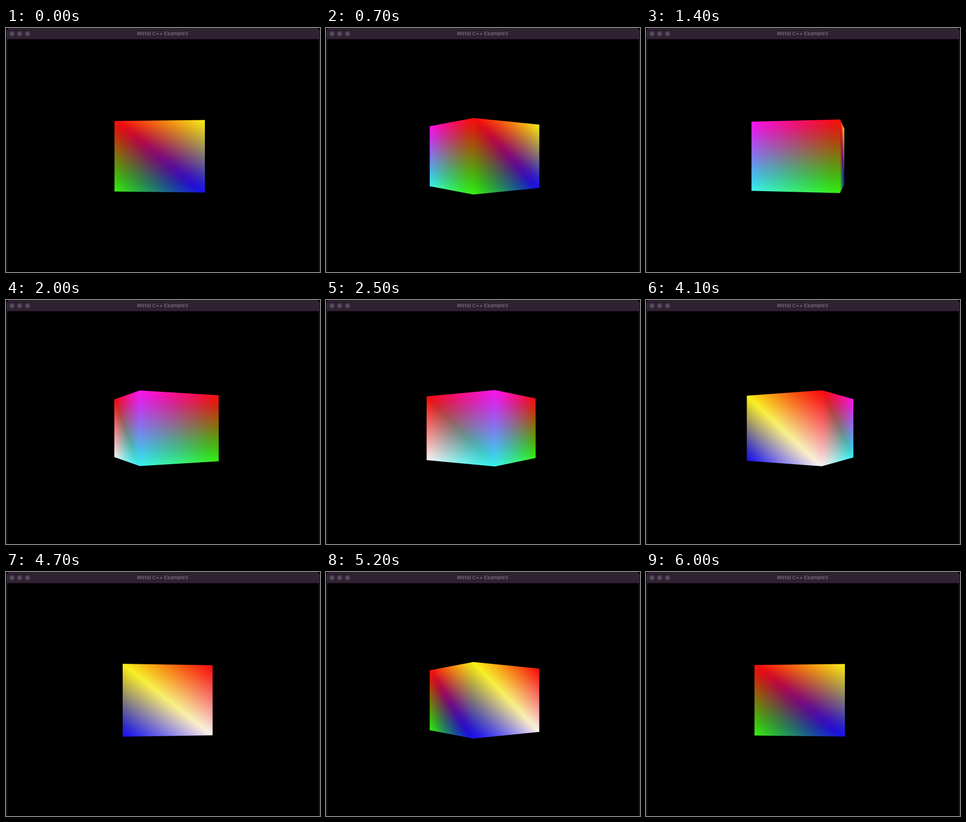
Write an HTML page with a canvas that moves like this. It is 600 px wide and 468 px high and loops after 6100 ms.

```html
<!DOCTYPE html>
<html lang="en">
<head>
<meta charset="utf-8">
<title>Metal C++ Example5</title>
<style>
  html, body { margin: 0; width: 100%; height: 100%; overflow: hidden; background: #000; }
  svg, canvas { position: absolute; left: 0; top: 0; display: block; }
  text { font: 700 9.4px Inter, "Open Sans", sans-serif; letter-spacing: .18px; fill: #6f6373; text-anchor: middle; }
</style>
</head>
<body>
<canvas id="view" width="600" height="468"></canvas>
<svg width="600" height="468" viewBox="0 0 600 468">
  <path d="M1 21.5V7Q1 1 7 1H593Q599 1 599 7V21.5Z" fill="#2f2131"/>
  <path d="M1.5 468V7Q1.5 1 7.5 1H592.5Q598.5 1 598.5 7V468" fill="none" stroke="#39333a"/>
  <g fill="#54485a">
    <circle cx="11.2" cy="11.1" r="4.6"/>
    <circle cx="26.1" cy="11.1" r="4.6"/>
    <circle cx="41" cy="11.1" r="4.6"/>
  </g>
  <text x="299.6" y="14.3">Metal C++ Example5</text>
</svg>
<script>
const ctx = document.getElementById('view').getContext('2d');

// Camera: screen centre, focal lengths and distance for a cube of half-size 1
const CX = 300, CY = 246, FX = 534, FY = 422, DIST = 7.15;
const STEP = 100, STEPS = 61, DEG_PER_STEP = 6, START = -50;

const RED = [1, 0, 0], GREEN = [0, 1, 0], BLUE = [0, 0, 1], YELLOW = [1, 1, 0],
      MAGENTA = [1, 0, 1], CYAN = [0, 1, 1], WHITE = [1, 1, 1];

// Vertical cube edges as [top, bottom], 90 degrees apart
const EDGES = [[RED, GREEN], [YELLOW, BLUE], [RED, WHITE], [MAGENTA, CYAN]];

// The display's own primaries, added up in linear light
const GAMMA = 2.2, PEAK = 247, BANDS = 8;
const PRIMARIES = [[250, 14, 14], [56, 240, 20], [30, 18, 238]]
  .map(p => p.map(v => (v / 255) ** GAMMA));

const lerp = (a, b, u) => a + (b - a) * u;
const mix = (a, b, u) => a.map((v, i) => lerp(v, b[i], u));

function toCss(color) {
  const light = color.map(v => v ** GAMMA);
  const out = [0, 1, 2].map(ch => {
    const sum = light.reduce((s, v, i) => s + v * PRIMARIES[i][ch], 0);
    return Math.round(Math.min(PEAK, 255 * sum ** (1 / GAMMA)));
  });
  return `rgb(${out})`;
}

function addStops(gradient, from, to, a, b) {
  for (let i = 0; i <= BANDS; i++) {
    gradient.addColorStop(lerp(from, to, i / BANDS), toCss(mix(a, b, i / BANDS)));
  }
}

function project([top, bottom], i, turn) {
  const a = (START + turn + i * 90) * Math.PI / 180;
  const x = Math.SQRT2 * Math.sin(a), z = DIST - Math.SQRT2 * Math.cos(a);
  return { top, bottom, x, z, sx: CX + FX * x / z };
}

// Each pixel column has constant depth, so one vertical gradient shades it;
// its middle lies on the diagonal shared by the face's two triangles.
function drawFace(l, r, end) {
  for (let px = Math.floor(l.sx); px < end; px++) {
    const s = (px + 0.5 - CX) / FX;
    const u = Math.min(1, Math.max(0, (s * l.z - l.x) / (r.x - l.x - s * (r.z - l.z))));
    const h = FY / lerp(l.z, r.z, u);
    const diagonal = mix(l.top, r.bottom, u);
    const g = ctx.createLinearGradient(0, CY - h, 0, CY + h);
    addStops(g, 0, u, mix(l.top, r.top, u), diagonal);
    addStops(g, u, 1, diagonal, mix(l.bottom, r.bottom, u));
    ctx.fillStyle = g;
    const x0 = Math.max(px, l.sx), x1 = Math.min(px + 1, end);
    ctx.fillRect(x0, CY - h, x1 - x0, 2 * h);
  }
}

function draw(step) {
  ctx.fillStyle = '#000';
  ctx.fillRect(0, 0, 600, 468);
  const pts = EDGES.map((e, i) => project(e, i, step * DEG_PER_STEP));
  const faces = pts.map((l, i) => [l, pts[(i + 1) % 4]])
    .filter(([l, r]) => l.sx < r.sx)
    .sort((a, b) => a[0].sx - b[0].sx);
  // A face with a neighbour on its right fills the shared pixel column
  faces.forEach(([l, r], i) =>
    drawFace(l, r, i < faces.length - 1 ? Math.ceil(r.sx) : r.sx));
}

const t0 = performance.now();
let shown = -1;
function tick() {
  const step = Math.floor((performance.now() - t0) / STEP) % STEPS;
  if (step !== shown) draw(shown = step);
  requestAnimationFrame(tick);
}
tick();
</script>
</body>
</html>
```
